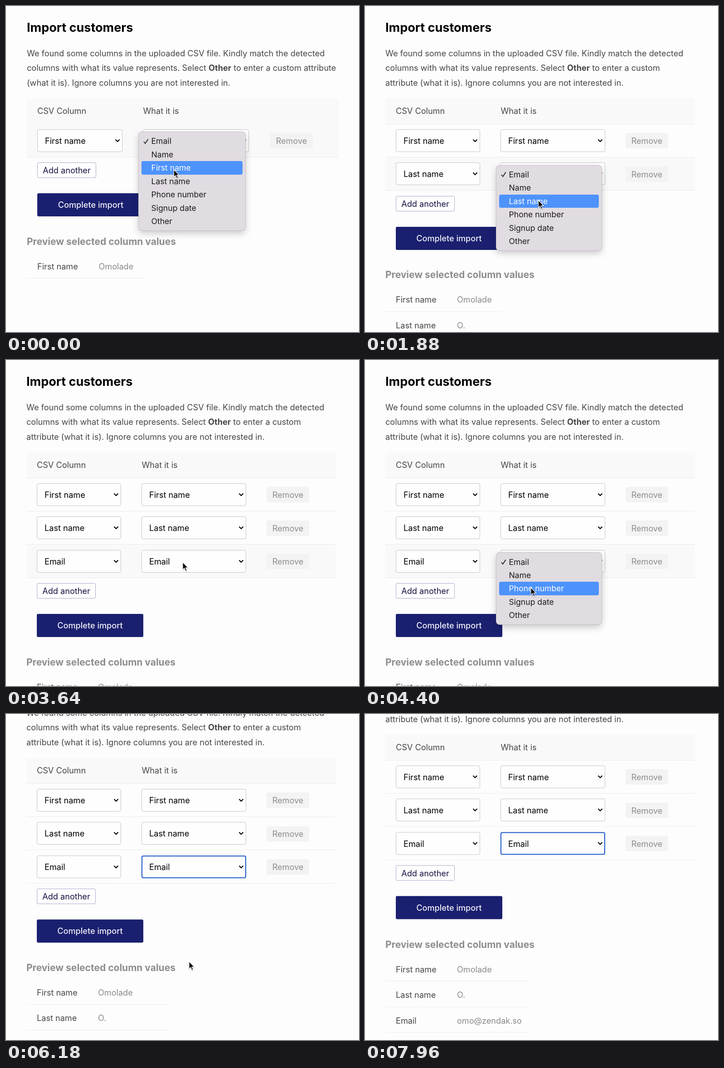
Write an HTML page that moves like this. It is 779 px wide and 719 px high and loops after 8 s.

```html
<!DOCTYPE html>
<html lang="en">
<head>
<meta charset="utf-8">
<title>Import customers</title>
<style>
  html, body { margin: 0; width: 100%; height: 100%; overflow: hidden; background: #fdfdfd; }
  #stage {
    position: relative; width: 779px; height: 719px; overflow: hidden; background: #fdfdfd;
    font: 18.13px/32.4px Inter, sans-serif; font-optical-sizing: none; color: #464646;
    --left: 45px; --width: 683px; --col1: 68px; --sel1: 186px; --col2: 299px; --sel2: 231px;
    --remove: 575px; --value: 203px; --cta: 235px; --rule: 256px;
  }
  #stage.wide {
    --left: 46px; --width: 689px; --col1: 69px; --sel1: 188px; --col2: 302px; --sel2: 234px;
    --remove: 583px; --value: 204.5px; --cta: 236px; --rule: 257px;
  }
  #stage.email { --rule: 318px; }
  #stage * { box-sizing: border-box; }
  #page, #page div, #menu, #menu div, svg { position: absolute; }
  #page div, #menu div { white-space: nowrap; }
  #page { inset: 0; }
  #page h1, #page h2, #page p { position: absolute; left: var(--left); margin: 0; white-space: nowrap; }
  h1 { top: 31.6px; font-size: 27px; color: #000; }
  p { top: 87.7px; }
  #page .head, #page .row { left: var(--left); width: var(--width); border-bottom: 1px solid #ebebeb; }
  #page .head { top: 204px; height: 56.6px; background: #f9f9f9; }
  #page .row { height: 73.6px; }
  .row.hover { background: #f9f9f9; }
  .c1 { left: calc(var(--col1) - var(--left)); }
  .c2 { left: calc(var(--col2) - var(--left)); }
  .head .c1, .head .c2 { top: 11.3px; }
  .head .c2 { margin-left: .5px; }
  .select {
    top: 11.6px; height: 50px; padding-left: 16px; line-height: 48px; color: #000;
    background: #fefefe; border: 1px solid #c3c3c3; border-radius: 4px;
  }
  .select.c1 { width: var(--sel1); }
  .select.c2 { width: var(--sel2); }
  .select.focus { border: 2px solid #1d58c6; padding-left: 15px; line-height: 46px; }
  .select svg { right: 4px; top: 20px; }
  .select.focus svg { right: 3px; top: 19px; }
  .remove {
    left: calc(var(--remove) - var(--left)); top: 20px; width: 94px; height: 34px;
    line-height: 34px; text-align: center; color: #8d8d8d; background: #f3f3f3; border-radius: 3px;
  }
  #foot { left: 0; }
  #add {
    left: var(--col1); top: 12px; width: 130px; height: 34px; line-height: 32px; text-align: center;
    color: #151342; background: #fefefe; border: 1px solid #a9a8c9; border-radius: 3px;
  }
  #cta {
    left: var(--col1); top: 80px; width: var(--cta); height: 51px; line-height: 51px; text-align: center;
    color: #f1f1f8; background: #1a206f; border-radius: 3px; font-weight: 500;
  }
  h2 { top: 170.5px; font-size: 21px; color: #8d8d8d; }
  .pair { left: var(--left); width: var(--rule); height: 56.4px; border-bottom: 1px solid #ebebeb; }
  .pair .c1, .pair .value { top: 13px; }
  .value { left: calc(var(--value) - var(--left)); color: #8a8a8a; }
  #menu {
    left: calc(var(--col2) - 9px); width: calc(var(--sel2) + 1px); background: #e1dbe2; border-radius: 7px;
    box-shadow: 0 0 0 1px #c5c0c6, 0 6px 16px rgba(0, 0, 0, .22); color: #1c1b1d;
    font-size: 17.6px; line-height: 29.45px;
  }
  #menu div { left: 6px; right: 6px; height: 29.45px; padding-left: 21.5px; border-radius: 4px; }
  #menu .on { background: #4e93fb; color: #fff; }
  #menu svg { left: 10px; top: 13.5px; }
  #cursor { left: 0; top: 0; filter: drop-shadow(0 1px 1px rgba(0, 0, 0, .3)); overflow: visible; }
</style>
</head>
<body>
<div id="stage">
  <div id="page">
    <h1>Import customers</h1>
    <p id="intro"></p>
    <div class="head"><div class="c1">CSV Column</div><div class="c2">What it is</div></div>
    <div id="rows"></div>
    <div id="foot">
      <div id="add">Add another</div>
      <div id="cta">Complete import</div>
      <h2>Preview selected column values</h2>
      <div id="pairs"></div>
    </div>
  </div>
  <div id="menu"></div>
  <svg id="cursor" width="14" height="21" viewBox="0 0 14 21">
    <path d="M0 0V16.2L3.7 12.8L6.5 19.2L9.2 18L6.4 11.8H11.6Z" stroke="#fff" stroke-width="1.2"/>
  </svg>
</div>
<script>
const LOOP = 8000, TABLE = 260, ROW = 73.6, ITEM = 29.45;
const ADDED = [-1, 700, 2960];
const COLUMNS = [['First name', 'Omolade'], ['Last name', 'O.'], ['Email', 'omo@zendak.so']];
const OPTIONS = ['Email', 'Name', 'First name', 'Last name', 'Phone number', 'Signup date', 'Other'];
const MENUS = [
  { open: -1, pick: 100, close: 240, choice: 'First name', taken: [] },
  { open: 1400, pick: 2110, close: 2260, choice: 'Last name', taken: ['First name'] },
  { open: 3700, pick: 5580, close: 5740, choice: 'Email', taken: ['First name', 'Last name'] }
];
// Pointer tip: time, x, y
const PATH = [
  [0, 370.5, 361], [270, 370, 361], [610, 172, 359.5], [860, 172, 359.5], [1300, 392, 371],
  [1480, 392, 372], [1950, 382, 432], [2270, 382, 432], [2730, 187, 437.5], [3080, 187, 437.5],
  [3580, 390, 446], [3800, 390, 447], [4300, 366, 502], [4750, 366, 503], [5450, 382, 460],
  [5760, 382, 460], [6000, 404, 546], [6650, 404, 546], [7050, 480, 580], [7650, 800, 545], [8000, 800, 545]
];
const INTRO = 'We found some columns in the uploaded CSV file. Kindly match the detected<br>' +
  'columns with what its value represents. Select <b>Other</b> to enter a custom ';

const $ = id => document.getElementById(id);
const stage = $('stage'), menu = $('menu');
const clamp = v => Math.min(1, Math.max(0, v));
const ramp = (t, a, b) => clamp((t - a) / (b - a));
const smooth = u => u * u * (3 - 2 * u);
const mix = (a, b, u) => a + (b - a) * u;

function add(parent, className, html = '') {
  const el = document.createElement('div');
  el.className = className;
  el.innerHTML = html;
  return parent.appendChild(el);
}

const chevron = '<svg width="12" height="8" viewBox="0 0 12 8"><path d="M1.5 1.5L6 6L10.5 1.5" fill="none" stroke="#000" stroke-width="2.1"/></svg>';
const tick = '<svg width="12" height="13" viewBox="0 0 12 13"><path d="M1 7.3L4.3 11L10.6 1.5" fill="none" stroke="#1c1b1d" stroke-width="1.7"/></svg>';

const rows = COLUMNS.map(([label, value], i) => {
  const el = add($('rows'), 'row');
  el.style.top = TABLE + i * ROW + 'px';
  add(el, 'select c1', label + chevron);
  const select = add(el, 'select c2', '<span></span>' + chevron);
  add(el, 'remove', 'Remove');
  const pair = add($('pairs'), 'pair');
  pair.style.top = 211.6 + i * 56.4 + 'px';
  add(pair, 'c1', label);
  add(pair, 'value', value);
  return { el, select, text: select.firstChild, pair };
});

let layout = 0, shown = -1;

function setLayout(count) {
  if (count === layout) return;
  layout = count;
  stage.classList.toggle('wide', count === 1);
  stage.classList.toggle('email', count === 3);
  $('intro').innerHTML = INTRO + (count === 1 ? 'attribute<br>' : '<br>attribute ') +
    '(what it is). Ignore columns you are not interested in.';
  rows.forEach((r, i) => r.el.style.display = r.pair.style.display = i < count ? '' : 'none');
  $('foot').style.top = TABLE - .4 + count * ROW + 'px';
}

function buildMenu(index) {
  if (index === shown) return;
  shown = index;
  const items = OPTIONS.filter(o => !MENUS[index].taken.includes(o));
  menu.innerHTML = tick;
  items.forEach((name, i) => add(menu, '', name).style.top = 5.4 + i * ITEM + 'px');
  menu.style.top = 278 + index * ROW + 'px';
  menu.style.height = items.length * ITEM + 11 + 'px';
}

function pointer(t) {
  const i = Math.max(1, PATH.findIndex(p => p[0] > t));
  const [a, b] = [PATH[i - 1], PATH[i]];
  const u = smooth(ramp(t, a[0], b[0]));
  return [mix(a[1], b[1], u), mix(a[2], b[2], u)];
}

function render(t) {
  const count = ADDED.filter(at => t >= at).length;
  const [x, y] = pointer(t);
  const scroll = 158.4 * (1 - (1 - ramp(t, 6000, 6580)) ** 3);
  const active = MENUS.findIndex(m => t >= m.open && t < m.close + 120);
  const opened = active >= 0 && t < MENUS[active].close;

  setLayout(count);
  $('page').style.transform = `translateY(${-scroll}px)`;
  $('cursor').style.transform = `translate(${x}px, ${y}px)`;

  const hovered = opened ? active : Math.floor((y + scroll - TABLE) / ROW);
  rows.forEach((r, i) => {
    const { close, choice } = MENUS[i];
    const blur = i < 2 ? ADDED[i + 1] : LOOP;
    r.el.classList.toggle('hover', i === hovered && x < 735);
    r.select.classList.toggle('focus', t >= close && t < blur);
    r.text.textContent = t >= close ? choice : 'Email';
  });

  menu.style.display = active < 0 ? 'none' : '';
  if (active >= 0) {
    const { pick, close } = MENUS[active];
    buildMenu(active);
    menu.style.opacity = 1 - ramp(t, close, close + 120);
    const blink = t >= pick && t < pick + 70;
    const held = t >= close ? pointer(close)[1] : y;
    const over = blink ? -1 : Math.floor((held - 283.2 - active * ROW) / ITEM);
    menu.querySelectorAll('div').forEach((el, i) => el.classList.toggle('on', i === over));
    menu.firstChild.firstChild.setAttribute('stroke', over === 0 ? '#fff' : '#1c1b1d');
  }

  const lit = ramp(t, 560, 640) * (1 - ramp(t, 750, 900)) + ramp(t, 2750, 2870) * (1 - ramp(t, 3010, 3160));
  $('add').style.boxShadow = `1px 2px 3px rgba(26, 31, 108, ${.4 * lit})`;
  $('add').style.borderColor = `rgb(${mix(169, 72, lit)}, ${mix(168, 75, lit)}, ${mix(201, 145, lit)})`;
}

const start = performance.now();
function frame() {
  render((performance.now() - start) % LOOP);
  requestAnimationFrame(frame);
}
frame();
</script>
</body>
</html>
```
